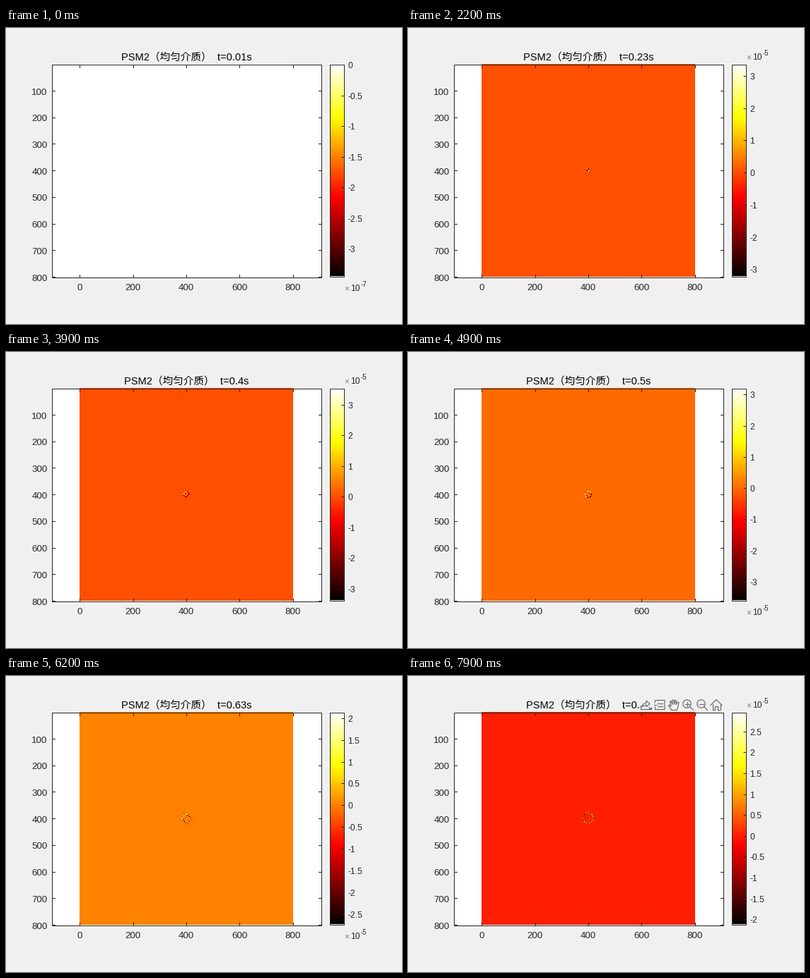
Animation, 560 px wide and 420 px high, one loop 8 s. Source, as a matplotlib script:

```python
import numpy as np
import matplotlib.pyplot as plt
from matplotlib.animation import FuncAnimation
from matplotlib.collections import LineCollection
from matplotlib.colors import ListedColormap
from matplotlib.patches import Circle, Rectangle

plt.rcParams["font.family"] = ["Liberation Sans", "Noto Sans CJK JP"]

W, H, DPI = 560, 420, 100
FRAMES, INTERVAL = 80, 100
PT = 72 / DPI                      # points per pixel
BG, INK, GREY = "#f0f0f0", "#262626", "#6a6a6a"
LEFT, RIGHT, TOP, BOTTOM = 64.5, 445.5, 51.5, 353.5
CB_L, CB_R, CB_B = 457.5, 477.5, 352.5
SCALE = 0.377                      # pixels per grid cell
CELLS, SRC, PATCH = 800, 399, 80
TOOLBAR_FROM = 72

# Colour limits in units of 1e-5: frame, low, high
LIMITS = np.array([
    (0, -0.0345, 0), (1, -0.62, 0.004), (2, -3.6, 0.05), (3, -5.8, 0.4),
    (4, -3.6, 1.0), (5, -1.6, 2.2), (7, -1.8, 4.2), (10, -2.09, 5.28),
    (22, -3.22, 3.35), (39, -3.39, 3.53), (49, -3.60, 3.19),
    (62, -2.74, 2.127), (79, -2.12, 2.95)])


def px(v):
    return 104.3 + (v - 0.5) * SCALE


def py(v):
    return TOP + (v - 0.5) * SCALE


def hot_map():
    i = np.arange(1, 257)
    ramps = [i / 96, (i - 96) / 96, (i - 192) / 64]
    return ListedColormap(np.clip(np.stack(ramps, axis=1), 0, 1))


def simulate(speed=25, freq=25, delay=0.04, dt=0.001, every=10):
    """Pseudo-spectral wave field around a Ricker point source."""
    k = 2 * np.pi * np.fft.fftfreq(PATCH)
    w2 = speed ** 2 * (k[:, None] ** 2 + k[None, :] ** 2)
    old = np.zeros_like(w2)
    cur = np.zeros_like(w2)
    snaps = []
    for step in range(FRAMES * every):
        a = (np.pi * freq * (step * dt - delay)) ** 2
        force = (1 - 2 * a) * np.exp(-a)
        old, cur = cur, 2 * cur - old + dt ** 2 * (force - w2 * cur)
        if (step + 1) % every == 0:
            snaps.append(np.fft.fftshift(np.fft.ifft2(cur).real))
    return snaps


fig = plt.figure(figsize=(W / DPI, H / DPI), dpi=DPI, facecolor=BG)
ax = fig.add_axes([0, 0, 1, 1])
ax.axis("off")
cmap = hot_map()


def text(x, y, s, size, ha="left", color=INK):
    return ax.text(x, y, s, fontsize=size * PT, ha=ha, va="baseline",
                   color=color)


def line(xs, ys, color=INK, width=1, z=3):
    return ax.plot(xs, ys, color=color, lw=width * PT, zorder=z)[0]


def frame(x0, y0, x1, y1):
    ax.add_patch(Rectangle((x0, y0), x1 - x0, y1 - y0, fill=False,
                           ec=INK, lw=PT, zorder=3))


# Main plot
ax.add_patch(Rectangle((LEFT, TOP), RIGHT - LEFT, BOTTOM - TOP, fc="white",
                       ec="none", zorder=0))
grid = np.zeros((CELLS, CELLS))
field = ax.imshow(grid, cmap=cmap, interpolation="nearest", aspect="auto",
                  extent=(px(0.5), px(800.5), py(800.5), py(0.5)), zorder=1)
frame(LEFT, TOP, RIGHT, BOTTOM)
for v in range(0, 801, 200):
    x = px(v)
    line([x, x], [TOP, TOP + 4])
    line([x, x], [BOTTOM, BOTTOM - 4])
    text(x - 0.3, 372.3, str(v), 13.33, "center")
for v in range(100, 801, 100):
    y = py(v)
    line([LEFT, LEFT + 4], [y, y])
    line([RIGHT, RIGHT - 4], [y, y])
    text(58.5, y + 5.6, str(v), 13.33, "right")
title = text(255.3, 45.3, "", 14.67, "center", "black")

# Colour bar
ax.imshow(np.arange(256)[::-1, None], cmap=cmap, interpolation="nearest",
          aspect="auto", extent=(CB_L, CB_R, CB_B, TOP + 0.5), zorder=1)
frame(CB_L, TOP + 0.5, CB_R, CB_B)
bar_ticks = ax.add_collection(
    LineCollection([], colors=INK, linewidths=PT, zorder=3))
bar_labels = [text(483, 0, "", 12) for _ in range(14)]
exp_parts = [(text(478.5, 0, "×", 12, color="#808080"), 0),
             (text(487.5, 0, "10", 12), 0),
             (text(501.2, 0, "", 9.6), -6)]


def make_toolbar():
    def stroke(*pts):
        xs, ys = zip(*pts)
        return line(xs, ys, GREY, 1.2, 6)

    def lens(cx):
        ring = Circle((cx - 1.5, 39.5), 5.7, fill=False, ec=GREY,
                      lw=1.2 * PT, zorder=6)
        return [ax.add_patch(ring), stroke((cx + 2.7, 43.7), (cx + 7.5, 48.5)),
                stroke((cx - 4.5, 39.5), (cx + 1.5, 39.5))]

    parts = [ax.add_patch(Rectangle((327, 32), 119, 18.5, fc=BG, ec="none",
                                    zorder=5))]
    # export
    parts += [stroke((329, 42), (329, 46.5), (341, 46.5), (341, 44)),
              stroke((331, 43.5), (332.5, 40), (337, 38), (337, 35),
                     (342, 39.5), (337, 43.5), (337, 41), (331, 43.5)),
              stroke((342, 47.5), (344.5, 47.5), (344.5, 45), (342, 47.5))]
    # data tips
    parts += [stroke((349, 38), (349.5, 34.5), (363, 34.5), (363, 47.5),
                     (349.5, 47.5), (349.5, 44)),
              stroke((348, 41), (351, 41)),
              stroke((353, 39), (360, 39)), stroke((353, 43), (360, 43))]
    # hand
    parts += [stroke((373, 48.5), (368.5, 42.5), (369, 41), (372, 43),
                     (370.5, 36), (372, 35.5), (374, 40.5), (374, 34),
                     (376, 34), (376.5, 40), (378, 34.5), (379.5, 35),
                     (379, 40.5), (381.5, 37), (383, 37.5), (381.5, 45),
                     (380, 48.5), (373, 48.5))]
    # zoom in, zoom out
    parts += lens(396) + [stroke((394.5, 36.5), (394.5, 42.5))] + lens(416)
    # home
    parts += [stroke((428, 41.5), (436, 33.5), (444, 41.5)),
              stroke((430.5, 40), (430.5, 48), (434, 48), (434, 43),
                     (438, 43), (438, 48), (441.5, 48), (441.5, 40))]
    return parts


toolbar = make_toolbar()
ax.set_xlim(0, W)
ax.set_ylim(H, 0)

snaps = simulate()
half = PATCH // 2
window = slice(SRC - half, SRC + half)


def draw_bar(lo, hi):
    peak = max(-lo, hi)
    power = int(np.floor(np.log10(peak))) - 5
    unit = 10.0 ** (-5 - power)
    lo, hi = lo * unit, hi * unit
    step = next(s for s in (0.1, 0.2, 0.5, 1, 2, 5) if (hi - lo) / s <= 11)
    values = np.arange(np.ceil(lo / step), np.floor(hi / step) + 1) * step
    top = TOP + 0.5
    ys = top + (hi - values) / (hi - lo) * (CB_B - top)
    bar_ticks.set_segments([[(CB_R - 3.5, y), (CB_R, y)] for y in ys])
    for label in bar_labels:
        label.set_text("")
    for label, v, y in zip(bar_labels, values, ys):
        label.set_text(f"{v:g}")
        label.set_y(y + 5)
    # the multiplier sits at the end with the larger magnitude
    base = 45.3 if hi > -lo else 373.3
    for part, lift in exp_parts:
        part.set_y(base + lift)
    exp_parts[-1][0].set_text(str(power))


def update(i):
    lo, hi = (np.interp(i, LIMITS[:, 0], LIMITS[:, c]) for c in (1, 2))
    u = snaps[i]
    grid[window, window] = np.where(u > 0, u / u.max() * hi, u / u.min() * lo)
    field.set_data(grid)
    field.set_clim(lo, hi)
    title.set_text(f"PSM2（均匀介质）  t={(i + 1) / 100:g}s")
    draw_bar(lo, hi)
    for part in toolbar:
        part.set_visible(i >= TOOLBAR_FROM)
    return [field]


anim = FuncAnimation(fig, update, frames=FRAMES, interval=INTERVAL,
                     repeat=True, repeat_delay=0, blit=False)
plt.show()
```
